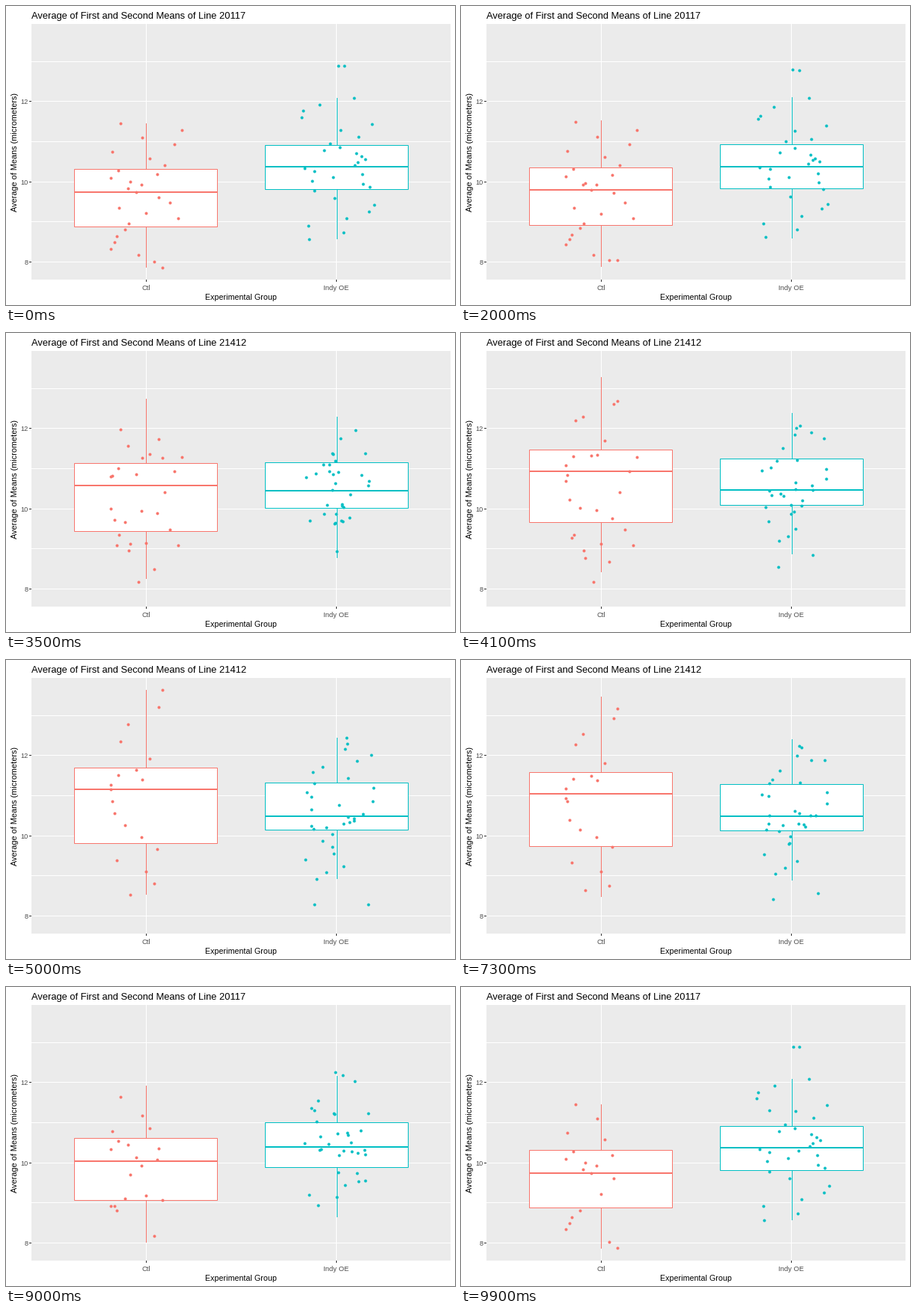
A matplotlib script for the animation above (10000 ms loop, 600x400 px).

```python
import numpy as np
import matplotlib.pyplot as plt
from matplotlib.animation import FuncAnimation
from matplotlib.patches import Rectangle

W, H, DPI = 600, 400, 100
PX = 72 / DPI  # one pixel in points
FRAMES, INTERVAL = 100, 100
LEAVE, ARRIVE, RETURN = 16, 50, 67

RED, TEAL, GREY = "#F8766D", "#00BFC4", "#333333"
TITLE = "Average of First and Second Means of Line {}"
LINES = ("20117", "21412")
JITTER = 50

rng = np.random.default_rng(20117)

plt.rcParams["font.family"] = "Liberation Sans"
fig = plt.figure(figsize=(W / DPI, H / DPI), dpi=DPI, facecolor="white")
ax = fig.add_axes([0, 0, 1, 1])
ax.set(xlim=(0, W), ylim=(H, 0))
ax.axis("off")


def line(x, y, color, width=1, z=1):
    return ax.plot(x, y, color=color, lw=width * PX, solid_capstyle="butt",
                   antialiased=False, snap=False, zorder=z)[0]


def label(x, y, text, size, color="black", ha="center", **kw):
    return ax.text(x, y, text, fontsize=size * PX, color=color, ha=ha,
                   va="baseline", **kw)


def sample(box, n, outliers=()):
    """Shuffled heights whose quartiles agree with the box."""
    q = np.linspace(0, 1, n - len(outliers))
    inner = np.interp(q, np.linspace(0, 1, len(box)), box)
    return rng.permutation(np.concatenate([inner, outliers]))


class Group:
    """A box and its points; unpaired points do not travel."""

    def __init__(self, mid, color, boxes, heights, rejitter):
        self.boxes = np.array(boxes, float)
        self.heights = heights
        n = [len(h) for h in heights]
        x = mid + rng.uniform(-JITTER, JITTER, (2, max(n)))
        if not rejitter:
            x[1] = x[0]
        self.x = [x[k, :n[k]] for k in (0, 1)]
        self.paired = min(n)

        left, right = mid - 96, mid + 95
        self.whisker = line([mid + 0.5] * 2, [0, 0], color, z=2)
        self.body = ax.add_patch(Rectangle(
            (left + 0.5, 0), right - left, 1, fc="white", ec=color,
            lw=PX, snap=False, zorder=3))
        self.median = line([left, right + 1], [0, 0], color, 2, z=4)
        self.dots = ax.plot([], [], "o", color=color, ms=4 * PX, mew=0,
                            antialiased=False, zorder=6)[0]

    def mix(self, pair, p, home):
        n = self.paired
        moving = pair[0][:n] * (1 - p) + pair[1][:n] * p
        return np.concatenate([moving, pair[home][n:]])

    def update(self, p, home):
        top, upper, med, lower, bottom = np.round(
            self.boxes[0] * (1 - p) + self.boxes[1] * p)
        self.whisker.set_ydata([top, bottom])
        self.body.set_y(upper + 0.5)
        self.body.set_height(lower - upper)
        self.median.set_ydata([med, med])
        self.dots.set_data(self.mix(self.x, p, home),
                           self.mix(self.heights, p, home))


# Panel, grid and axes
ax.add_patch(Rectangle((34, 24), 560, 342, fc="#EBEBEB", lw=0, zorder=0))
for k in range(6):
    y = 74 + int(k * 53.7)
    line([34, 594], [y + 0.5] * 2, "white")
    if k % 2:
        line([31, 34], [y + 0.5] * 2, GREY)
        label(29.5, y + 4, str(13 - k), 9.2, "#4D4D4D", "right")
for name, x in (("Ctl", 187), ("Indy OE", 441)):
    line([x + 0.5] * 2, [24, 366], "white")
    line([x + 0.5] * 2, [366, 369], GREY)
    label(x, 380, name, 9.4, "#4D4D4D")
label(314, 393, "Experimental Group", 10.6)
label(15, 195.5, "Average of Means (micrometers)", 10.9,
      rotation=90, rotation_mode="anchor")
title = label(34, 17, "", 12.9, ha="left")

# Upper whisker, upper hinge, median, lower hinge, lower whisker
ctl_boxes = (157, 218, 249, 295, 350), (40, 144, 173, 245, 314)
indy_boxes = (123, 186, 215, 245, 312), (104, 164, 209, 227, 293)
groups = (
    Group(187, RED, ctl_boxes,
          (sample(ctl_boxes[0], 27), sample(ctl_boxes[1], 19)), False),
    Group(442, TEAL, indy_boxes,
          (sample(indy_boxes[0], 32, (80, 80)),
           sample(indy_boxes[1], 34, (327, 327))), True),
)


def progress(i):
    """Linear position between the first line (0) and the second (1)."""
    if i < ARRIVE:
        return max(0, (i - LEAVE) / (ARRIVE - LEAVE))
    return 1 - max(0, (i - RETURN) / (FRAMES - RETURN))


def update(i):
    t = progress(i)
    eased = (1 - np.cos(np.pi * t)) / 2
    title.set_text(TITLE.format(LINES[int(t >= 0.5)]))
    for group in groups:
        group.update(eased, int(i >= ARRIVE))
    return ()


anim = FuncAnimation(fig, update, frames=FRAMES, interval=INTERVAL,
                     repeat=True, repeat_delay=0, blit=False)
plt.show()
```
